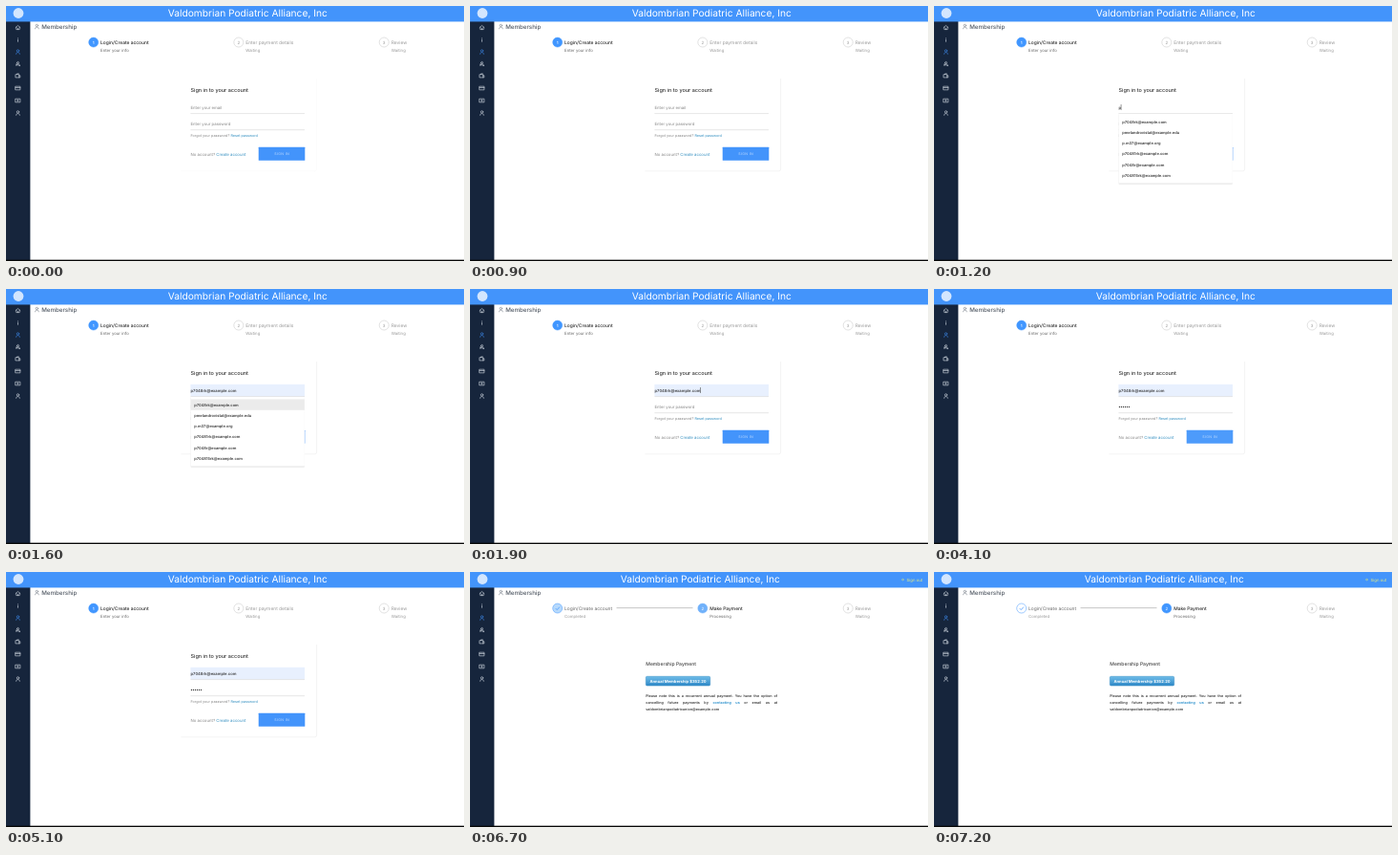
These frames come from a looping animation (480x267 px, 8000 ms). An HTML page:

```html
<!DOCTYPE html>
<html lang="en">
<head>
<meta charset="utf-8">
<title>Membership</title>
<style>
html, body { margin: 0; width: 100%; height: 100%; overflow: hidden; background: #fff; }
#stage { display: block; width: 100vw; height: 100vh; }
#stage, p { font-family: Inter, "Liberation Sans", sans-serif; text-rendering: geometricPrecision; }
.icon { fill: none; stroke: #cdd4dd; stroke-width: .65; stroke-linecap: round; stroke-linejoin: round; }
.title { font-size: 4.9px; }
.small { font-size: 4.3px; }
.on { font-weight: 500; fill: #262626; }
.mid { fill: #666; }
.off { fill: #999; }
.hint { fill: #858585; }
.link { fill: #338fc0; }
.num { font-size: 4.4px; text-anchor: middle; }
.ring { fill: #fff; stroke: #c4c4c4; stroke-width: .5; }
.line { stroke: #cfcfcf; stroke-width: .5; }
.value { font-size: 4.2px; font-weight: 500; fill: #2a2a2a; }
p { margin: 0; font-size: 3.7px; line-height: 7px; font-weight: 700; color: #4c4c4c; white-space: nowrap; text-align: justify; text-align-last: justify; }
p.last { text-align-last: left; }
p b { color: #3596cf; }
</style>
</head>
<body>
<svg id="stage" viewBox="0 0 480 267" preserveAspectRatio="none">
  <defs>
    <linearGradient id="gloss" x1="0" y1="0" x2="0" y2="1">
      <stop offset="0" stop-color="#70bde9"/>
      <stop offset="1" stop-color="#2c87c6"/>
    </linearGradient>
    <filter id="soft" x="-10%" y="-10%" width="120%" height="125%">
      <feDropShadow dx="0" dy=".5" stdDeviation=".7" flood-opacity=".26"/>
    </filter>
    <g id="person">
      <circle cy="-1.1" r="1.2"/>
      <path d="M-1.9 2.3C-1.8 -.2 1.8 -.2 1.9 2.3"/>
    </g>
  </defs>

  <rect width="480" height="267" fill="#fff"/>
  <rect y="16" width="25.4" height="250" fill="#16253c"/>
  <rect width="480" height="16.4" fill="#4394fb"/>
  <rect y="265.7" width="480" height="1.3" fill="#050505"/>
  <circle cx="13" cy="7.5" r="5.4" fill="#d3e6fe"/>
  <text id="brand" y="11.4" font-size="10.2" fill="#fff" text-anchor="middle">Valdombrian Podiatric Alliance, Inc</text>

  <g class="icon">
    <path transform="translate(12.5 22.5)" d="M-2.4 .1L0 -2.1L2.4 .1M-1.7 -.4V2.1H1.7V-.4M0 2V.8"/>
    <path transform="translate(12.5 35.5)" d="M0 -1.7V-1.6M0 -.3V1.8"/>
    <use href="#person" x="12.5" y="48" stroke="#3b86e4"/>
    <path transform="translate(12.5 60.5)" d="M-1.7 2C-1.7 .4 -.8 0 0 0S1.8 .6 2 2M-1 -1.1A1 1 0 1 1 1 -1.1A1 1 0 1 1 -1 -1.1M-2 .6L1.9 2"/>
    <path transform="translate(12.5 73)" d="M-2.2 -1.3H1.2V1.9H-2.2ZM-1 -1.4V-2.1H.8M1.2 -.3H2.3V1.9H1.2"/>
    <path transform="translate(12.5 86)" d="M-2.4 -1.8H2.4V1.8H-2.4ZM-2.4 -.5H2.4"/>
    <path transform="translate(12.5 99)" d="M-2.4 -1.8H2.4V1.8H-2.4ZM-.7 0A.7 .7 0 1 1 .7 0A.7 .7 0 1 1 -.7 0"/>
    <use href="#person" x="12.5" y="112"/>
    <use href="#person" x="32.4" y="21.5" stroke="#777f8a"/>
  </g>
  <text x="37.2" y="23.8" font-size="6.2" font-weight="500" fill="#515964">Membership</text>

  <circle id="dot1" class="ring" cx="91.7" cy="38" r="5"/>
  <circle id="dot2" class="ring" cx="243.8" cy="38" r="5"/>
  <circle class="ring" cx="396.2" cy="38" r="5"/>
  <text class="num off" x="396.2" y="39.6">3</text>
  <text class="title off" x="403.7" y="39.8">Review</text>
  <text class="small off" x="403.7" y="47.6">Waiting</text>

  <g id="login">
    <text class="num" x="91.7" y="39.6" font-weight="500" fill="#fff">1</text>
    <text class="title on" x="99.1" y="39.8">Login/Create account</text>
    <text class="small mid" x="99.1" y="47.6">Enter your info</text>
    <text class="num off" x="243.8" y="39.6">2</text>
    <text class="title off" x="251.2" y="39.8">Enter payment details</text>
    <text class="small off" x="251.2" y="47.6">Waiting</text>

    <path id="card" d="M325.6 76V171Q325.6 172.8 323.6 172.8H183.5" fill="none" stroke="#ebebeb" stroke-width=".6"/>
    <text x="193.5" y="89.9" font-size="5.5" font-weight="500" fill="#333">Sign in to your account</text>

    <rect id="fill" x="193.4" y="99.8" width="119.6" height="12.6" fill="#e8f0fe"/>
    <path class="line" d="M193.4 112.6H313M193.4 129.7H313"/>
    <text id="mailHint" class="small hint" x="193.5" y="107.7">Enter your email</text>
    <text id="mail" class="value" x="193.5" y="107.6"></text>
    <text id="passHint" class="small hint" x="193.5" y="124.8">Enter your password</text>
    <g id="dots" fill="#333"></g>

    <text x="193.5" y="136.7" font-size="3.78" class="hint">Forgot your password? <tspan class="link">Reset password</tspan></text>
    <text x="193.5" y="156.6" class="small hint">No account? <tspan class="link">Create account</tspan></text>
    <rect id="button" x="264.7" y="147.7" width="48.6" height="14" rx=".5"/>
    <text x="289.2" y="156.1" font-size="3.6" letter-spacing=".38" fill="#c0dcff" text-anchor="middle">SIGN IN</text>

    <g id="menu">
      <rect x="193.5" y="113" width="119.4" height="72.4" rx=".6" fill="#fff" filter="url(#soft)"/>
      <rect id="hover" x="193.5" y="115.4" width="119.4" height="11.4" fill="#ebebeb"/>
    </g>
    <rect id="caret" width=".5" height="6" fill="#333"/>
  </g>

  <g id="pay">
    <path d="M89.7 38.1L91.2 39.6L93.9 36.6" fill="none" stroke="#4096ff" stroke-width=".75"/>
    <text class="title mid" x="99.1" y="39.8">Login/Create account</text>
    <text class="small off" x="99.1" y="47.6">Completed</text>
    <path d="M153.5 37.6H233.5" stroke="#a0a0a0" stroke-width=".6"/>
    <text class="num" x="243.8" y="39.6" fill="#fff">2</text>
    <text class="title on" x="251.2" y="39.8">Make Payment</text>
    <text class="small mid" x="251.2" y="47.6">Processing</text>

    <path d="M452 8H454.5M453.5 7L454.6 8L453.5 9" fill="none" stroke="#dfe97a" stroke-width=".6"/>
    <text x="457.5" y="9.6" font-size="4.3" fill="#e8ee7c">Sign out</text>

    <text x="184.3" y="98.2" font-size="5.05" font-weight="500" fill="#404040">Membership Payment</text>
    <rect x="184.3" y="109.3" width="67.4" height="9.8" rx="1.3" fill="url(#gloss)" stroke="#3b8dc2" stroke-width=".5"/>
    <text x="218" y="115.8" font-size="4.15" font-weight="700" fill="#fff" text-anchor="middle">Annual Membership $352.20</text>
    <foreignObject x="184.2" y="126.4" width="138" height="24">
      <p>Please note this is a recurrent annual payment. You have the option of</p>
      <p>cancelling future payments by <b>contacting us</b> or email us at</p>
      <p class="last">valdombrianpodiatricunion@example.com</p>
    </foreignObject>
  </g>
</svg>
<script>
const LOOP = 8000, PAID = 6700, DOT = 2;
const BLUE = [64, 150, 255], WHITE = [255, 255, 255];
const MAIL = "p7048rk@example.com";
const MENU = [MAIL, "pmelandrovistal@example.edu", "p.m37@example.org",
  "p70481rk@example.com", "p7048r@example.com", "p704815rk@example.com"];

// [time, value] steps; the last one reached holds
const mailSteps = [[0, ""], [1200, "p"], [1600, MAIL]];
const menuSteps = [[0, 0], [1200, 1], [1600, 2], [1900, 0]];
const dotSteps = [[0, 0], [2700, 1], [3000, 3], [3300, 4], [3400, 5], [3500, 6]];
const caretSteps = [[0, ""], [300, "mail"], [900, ""], [1200, "mail"], [1600, ""],
  [1900, "mail"], [2200, "pass"], [4000, ""]];
const buttonSteps = [[0, "#4394fb"], [4000, "#4d9bfb"], [4800, "#4394fb"]];

const $ = id => document.getElementById(id);
const at = (steps, t) => steps.filter(s => s[0] <= t).pop()[1];
const show = (id, on) => $(id).setAttribute("visibility", on ? "visible" : "hidden");
const mix = (a, b, k) => "rgb(" + a.map((v, i) => Math.round(v + (b[i] - v) * k)) + ")";

function add(parent, tag, attrs, text = "") {
  const el = document.createElementNS("http://www.w3.org/2000/svg", tag);
  for (const key in attrs) el.setAttribute(key, attrs[key]);
  el.textContent = text;
  return parent.appendChild(el);
}

MENU.forEach((m, i) => add($("menu"), "text",
  { x: 197.2, y: 122.5 + i * 11.27, "font-size": 4, "font-weight": 600, fill: "#3a3a3a" }, m));
const dots = Array.from({ length: 6 }, (_, i) =>
  add($("dots"), "circle", { cx: 194.4 + i * DOT, cy: 123.5, r: .65 }));

function paint(t) {
  const paid = t >= PAID;
  $("login").style.display = paid ? "none" : "";
  $("pay").style.display = paid ? "" : "none";
  $("brand").setAttribute("x", paid ? 241.3 : 253.3);

  const k = Math.min(1, Math.max(0, (t - PAID) / 300));
  const [one, two] = [$("dot1").style, $("dot2").style];
  const blue = mix(BLUE, BLUE, 0);
  one.fill = paid ? mix([182, 217, 252], WHITE, k) : blue;
  one.stroke = blue;
  two.fill = paid ? mix([112, 177, 250], BLUE, k) : "#fff";
  two.stroke = paid ? two.fill : "#c4c4c4";
  if (paid) return;

  const mail = at(mailSteps, t), menu = at(menuSteps, t);
  const count = at(dotSteps, t), caret = at(caretSteps, t);
  if ($("mail").textContent !== mail) $("mail").textContent = mail;
  show("mailHint", !mail);
  show("fill", mail === MAIL);
  show("menu", menu > 0);
  show("hover", menu === 2);
  show("passHint", !count);
  dots.forEach((d, i) => d.setAttribute("visibility", i < count ? "visible" : "hidden"));
  $("card").setAttribute("opacity", t < 500 ? .3 : 1);
  $("button").setAttribute("fill", at(buttonSteps, t));

  show("caret", caret);
  const inMail = caret === "mail";
  const end = inMail ? (mail ? $("mail").getComputedTextLength() - .2 : 0) : count * DOT;
  $("caret").setAttribute("x", 193.4 + end);
  $("caret").setAttribute("y", inMail ? 103 : 120);
}

const start = performance.now();
function tick(now) {
  paint(Math.max(0, now - start) % LOOP);
  requestAnimationFrame(tick);
}
paint(0);
requestAnimationFrame(tick);
</script>
</body>
</html>
```
